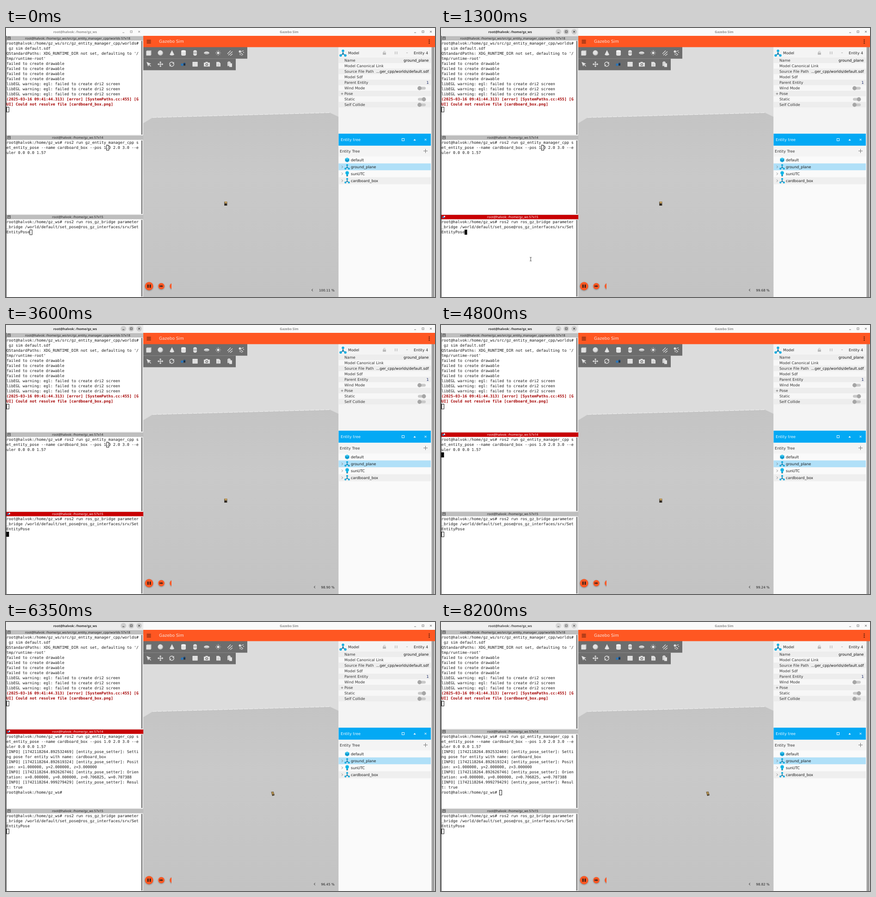
These frames come from a looping animation (928x583 px, 8.25 s). An HTML page with a canvas:

```html
<!DOCTYPE html>
<html>
<head>
<meta charset="utf-8">
<style>
html, body { margin: 0; width: 100%; height: 100%; overflow: hidden; background: #fff; }
canvas { display: block; }
</style>
</head>
<body>
<canvas id="stage" width="928" height="583"></canvas>
<script>
const stage = document.getElementById('stage');
const LOOP = 8250, COL = 5.02, ROW = 11;
const MONO = '8.34px "DejaVu Sans Mono", monospace';
const UI = '8px "DejaVu Sans", sans-serif';
const BAR = '7px "Noto Sans", sans-serif';
const USER = 'root@halvok', PROMPT = USER + ':/home/gz_ws# ';

// Times of the user's actions
const FOCUS_BOTTOM = 830, ENTER_BOTTOM = 3550, FOCUS_MIDDLE = 4150, ENTER_MIDDLE = 4450;
const LOG = 4950, MOVED = 5050, BLUR = 8150, LAND = 782;

let c = stage.getContext('2d');

const clamp = v => Math.max(0, Math.min(1, v));
const ease = v => { v = clamp(v); return v * v * (3 - 2 * v); };
const gray = v => `rgb(${v},${v},${v})`;

function rect(x, y, w, h, fill) { c.fillStyle = fill; c.fillRect(x, y, w, h); }
function frame(x, y, w, h, color, width = 1) {
  c.strokeStyle = color; c.lineWidth = width; c.strokeRect(x, y, w, h);
}
function disc(x, y, r, fill, ry = r) {
  c.fillStyle = fill; c.beginPath(); c.ellipse(x, y, r, ry, 0, 0, 7); c.fill();
}
function shape(d, fill, x = 0, y = 0) {
  c.save(); c.translate(x, y); c.fillStyle = fill; c.fill(new Path2D(d)); c.restore();
}
function line(d, color, x = 0, y = 0, width = 1) {
  c.save(); c.translate(x, y); c.strokeStyle = color; c.lineWidth = width;
  c.stroke(new Path2D(d)); c.restore();
}
function text(s, x, y, color = '#222', font = UI, align = 'left') {
  c.font = font; c.fillStyle = color; c.textAlign = align;
  c.textRendering = 'geometricPrecision';
  c.fillText(s, x, y);
}

function terminal(lines, top) {
  let row = 0;
  for (const s of lines) {
    const bold = s.startsWith('(2025');
    for (const part of s.match(/.{1,57}/g))
      text(part, 1, top + ROW * row++ + 3, bold ? '#a40000' : '#171717', (bold ? 'bold ' : '') + MONO);
  }
}
function cursor(col, row, top, solid, glyph) {
  const x = 1 + col * COL, y = top + row * ROW - 5.5;
  if (!solid) return frame(Math.round(x) + .5, Math.round(y) + .5, 5, 10.5, '#222');
  rect(Math.round(x), Math.round(y), 5.5, 11, '#000');
  if (glyph) text(glyph, x, y + 8.5, '#fff', MONO);
}
const blinkOn = (t, since) => (t - since) % 1200 < 600;

function paneBar(y, label, focused) {
  rect(1, y, 296, 9.5, focused ? '#c80003' : '#bebebe');
  text(label, 155, y + 7.3, focused ? '#fff' : '#222', BAR, 'center');
  if (focused) {
    rect(3, y + 3, 4, 4, '#3d6fae');
    rect(6, y + 2, 3, 3, '#e8e8e8');
  } else {
    frame(3.5, y + 1.5, 6, 6, '#333', .8);
    line('M3.5 5H9.5M6.5 2V5', '#333', 0, y - .5, .8);
  }
}

function windowButtons(xs, color, disk) {
  if (disk) xs.forEach(x => disc(x, 8, 6, disk));
  line('M-2 2H2', color, xs[0], 8);
  frame(xs[1] - 2, 6, 4, 4, color, .9);
  line('M-2 -2L2 2M2 -2L-2 2', color, xs[2], 8);
}

function modelIcon(x, y, k = 1) {
  c.save(); c.translate(x, y); c.scale(k, k);
  line('M0 -3V1L-4 4M0 1L4 4', '#245b78', 0, 0, 1.2);
  disc(0, -4, 2.2, '#16aee0'); disc(-4, 4, 2.2, '#16aee0');
  disc(4, 4, 2.2, '#16aee0'); disc(0, 1, 1.6, '#1583b4');
  c.restore();
}

function toolbar() {
  rect(297, 41, 225, 25.5, '#6d6d6d');
  rect(297, 66.5, 200, 25, '#6d6d6d');
  const W = '#e2e2e2', D = '#bdbdbd';
  c.save(); c.translate(309, 54);
  shape('M-5.5 -4L-4 -5.5H5.5V4L4 5.5H-5.5Z', D); rect(-5.5, -4, 9.5, 9.5, W);
  disc(25, 0, 5.8, D); disc(24.5, -.8, 4.6, W);
  shape('M50 -6L55 4Q50 7 45 4Z', W);
  rect(70, -4, 10, 8, W); disc(75, 4, 5, W, 2); disc(75, -4, 5, '#f4f4f4', 2);
  c.fillStyle = W; c.beginPath(); c.roundRect(96, -6, 8, 12, 4); c.fill(); rect(96, -2, 8, 4, D);
  disc(125, 0, 5.8, W, 3); disc(125, 1, 5, D, 1.6);
  disc(150, 0, 2.7, W);
  for (let i = 0; i < 8; i++) {
    const a = i * Math.PI / 4, x = Math.cos(a), y = Math.sin(a);
    line(`M${150 + 4 * x} ${4 * y}L${150 + 5.8 * x} ${5.8 * y}`, W);
  }
  line('M170 2L177 -5M172 5L181 -3M176 6L181 2', W, 0, 0, 1.2);
  disc(197, -3, 2.5, W);
  line('M200 -3L205 -5M199 0L204 4M197 1L198 5', W, 0, 0, 1.2);
  disc(205, -1, 1, W); disc(201, 5, 1, W);
  c.restore();

  c.save(); c.translate(309, 78.5);
  shape('M-5 -5L5 -1L1 .5L5 4L4 5L0 1.5L-1.5 5Z', W);
  line('M20 0H30M25 -5V5', W, 0, 0, 1.3);
  for (let i = 0; i < 4; i++) {
    c.save(); c.translate(25, 0); c.rotate(i * Math.PI / 2);
    shape('M0 -6.3L2.4 -3.4H-2.4Z', W); c.restore();
  }
  line('M45 1A4.6 4.6 0 0 1 53 -3M54 -1A4.6 4.6 0 0 1 46 3', W, 0, 0, 1.3);
  shape('M54.5 -5V-1H50.5ZM44.8 5V1H48.8Z', W);
  disc(72, 1, 2.8, '#2c76b8'); disc(77, -1, 2.3, '#174c83'); rect(75, -1, 4, 4, '#222f3d');
  rect(94.5, -5, 11, 10, '#f3f3f3');
  line('M98 -5V5M102 -5V5M94.5 -1.5H105.5M94.5 2H105.5', '#b0b0b0', 0, 0, .6);
  rect(119, -3.5, 13, 8.5, W); rect(122.5, -5, 5, 2, W); disc(125.3, .8, 2.8, '#6d6d6d'); disc(125.3, .8, 1.5, W);
  shape('M146 -5H152L155 -2V5H146Z', W); line('M148 0H153M148 2.5H153', '#aaa', 0, 0, .7);
  rect(170, -5, 7, 9, '#cfcfcf'); rect(172, -6, 3, 2, W); rect(174, -2, 6, 8, W);
  c.restore();
}

function scene() {
  rect(297, 41, 422.5, 542, '#dcdcdc');
  const ground = c.createLinearGradient(0, 184, 0, 583);
  ground.addColorStop(0, '#c4c4c4');
  ground.addColorStop(.35, '#c9c9c9');
  ground.addColorStop(1, '#c3c3c3');
  shape('M297 206L317 194L701 183.5L719.5 192V583H297Z', ground);
  c.setLineDash([9, 2]);
  line('M317 194L701 183.5', '#f2f2f2');
  c.setLineDash([]);
  line('M297 206L317 194M701 183.5L719 192', '#d8d8d8');
  toolbar();
  c.save();
  c.beginPath(); c.rect(297, 540, 61, 43); c.clip();
  c.shadowColor = 'rgba(0,0,0,.35)'; c.shadowBlur = 3; c.shadowOffsetY = 1;
  disc(309.5, 559.5, 9, '#ff5722'); disc(336, 559.5, 6.7, '#ff5722'); disc(361, 559.5, 6.7, '#ff5722');
  c.restore();
  rect(306, 556, 2.4, 7, '#1a1a1a'); rect(310.7, 556, 2.4, 7, '#1a1a1a');
  shape('M332.5 557.3L336 559.5L332.5 561.7ZM336 557.3L339.7 559.5L336 561.7Z', '#1a1a1a');
}

function toggle(y, on) {
  c.fillStyle = '#c9c9c9'; c.beginPath(); c.roundRect(891, y - 3, 17, 6, 3); c.fill();
  disc(on ? 904 : 894.5, y, 4.4, '#a6a6a6');
}

function inspector() {
  rect(719.5, 41, 208.5, 542, '#fafafa');
  rect(719.5, 41, 200.5, 188, '#f4f4f4');
  rect(920.5, 41, 6.5, 542, '#a0a0a0');
  modelIcon(729, 54.5, 1.25);
  text('Model', 740, 57);
  text('Entity 4', 913, 57, '#222', UI, 'right');
  rect(815, 53, 7, 5, '#bcbcbc'); line('M817 53V50.5H820.5V51.5', '#bcbcbc');
  rect(841, 51, 1.5, 6, '#bcbcbc'); rect(845, 51, 1.5, 6, '#bcbcbc');
  shape('M865.5 53H869.5L867.5 55Z', '#bcbcbc');
  ['Name', 'Model Canonical Link', 'Source File Path', 'Model Sdf', 'Parent Entity',
    'Wind Mode', 'Pose', 'Static', 'Self Collide'].forEach((s, i) => {
    const y = 70 + i * 12;
    rect(719.5, y - 6, 199.5, 12, i % 2 ? '#f7f7f7' : '#ededed');
    text(s, 732, y + 3, '#333');
  });
  text('ground_plane', 914.5, 73, '#111', UI, 'right');
  text('...ger_cpp/worlds/default.sdf', 914.5, 97, '#111', UI, 'right');
  text('1', 914.5, 121, '#0b1a5c', UI, 'right');
  line('M724.5 142.5H729.5M727 140V145', '#666', 0, 0, .8);
  toggle(130.5); toggle(154.5, true); toggle(166.5);

  rect(719.5, 229, 199.5, 26, '#03a9f4');
  text('Entity tree', 724, 245, '#f4fbff', '8.2px "DejaVu Sans", sans-serif');
  frame(856.5, 239.5, 5, 5, '#fff', .9);
  shape('M881.5 244H886.5L884 240.5Z', '#fff');
  line('M-2 -2L2 2M2 -2L-2 2', '#fff', 907.5, 242);
  rect(719.5, 255, 199.5, 23.5, '#f4f4f4');
  text('Entity Tree', 722, 269.5, '#333', '8.2px "DejaVu Sans", sans-serif');
  line('M903 266.5H912M907.5 262V271', '#777');
  ['default', 'ground_plane', 'sunUTC', 'cardboard_box'].forEach((s, i) => {
    const y = 286 + i * 15;
    rect(719.5, y - 7.5, 199.5, 15, ['#fafafa', '#b0e0f8', '#fafafa', '#efefef'][i]);
    text(s, 746, y + 2.8, '#1b1b1b');
    if (i) line('M-1 -2.5L1.5 0L-1 2.5', '#777', 727, y, .9);
    if (i % 2) modelIcon(738, y, .95);
  });
  shape('M738 281L742.5 283.3V288.5L738 291L733.5 288.5V283.3Z', '#0e9bd0');
  shape('M738 281L742.5 283.3L738 285.7L733.5 283.3Z', '#3cc8ef');
  disc(738, 314, 3.8, '#13b5e6'); rect(736, 317, 4, 3.5, '#13b5e6'); rect(736.5, 320, 3, 1.5, '#45606c');
}

function backdrop() {
  rect(0, 0, 928, 583, '#fff');
  rect(297, 0, 631, 17, '#fafafa');
  text('Gazebo Sim', 612.5, 10.5, '#8c8c8c', 'bold ' + BAR, 'center');
  windowButtons([885, 902, 919], '#777');
  scene();
  inspector();
  rect(297, 17, 631, 24.5, '#ff5722');
  line('M304.5 26.5H313.5M304.5 29.5H313.5M304.5 32.5H313.5', '#2a0d05', 0, 0, 1.2);
  text('Gazebo Sim', 331, 32.3, '#f8e6df', '9px "DejaVu Sans", sans-serif');
  for (const y of [26, 29.5, 33]) disc(915.5, y, 1.1, '#2a0d05');

  rect(0, 17, 1, 566, '#333');
  for (const [y, h] of [[27, 204], [243, 160], [415, 167]]) {
    rect(292, y, 4, h, '#ececec');
    rect(292.7, y + 1, 2.3, h - 1, '#777');
  }
  rect(1, 231, 296, 2, '#eee'); rect(1, 403, 296, 2, '#eee'); rect(296, 17, 1, 566, '#ddd');
  paneBar(17.5, USER + ': /home/gz_ws/src/gz_entity_manager_cpp/worlds 57x18', false);
  terminal([
    USER + ':/home/gz_ws/src/gz_entity_manager_cpp/worlds# gz sim default.sdf',
    "QStandardPaths: XDG_RUNTIME_DIR not set, defaulting to '/tmp/runtime-root'",
    ...Array(4).fill('failed to create drawable'),
    ...Array(3).fill('libEGL warning: egl: failed to create dri2 screen'),
    '(2025-03-16 09:41:44.313) [error] [SystemPaths.cc:455] [GUI] Could not resolve file [cardboard_box.png]'
  ], 33);
  cursor(0, 13, 33, false);
  terminal([PROMPT + 'ros2 run gz_entity_manager_cpp set_entity_pose --name cardboard_box --pos 1.0 2.0 3.0 --euler 0.0 0.0 1.57'], 248);
  terminal([PROMPT + 'ros2 run ros_gz_bridge parameter_bridge /world/default/set_pose@ros_gz_interfaces/srv/SetEntityPose'], 420);
}

const info = (nanos, s) => `[INFO] [1742118264.${nanos}] [entity_pose_setter]: ${s}`;
const poseLog = [
  info('892532469', 'Setting pose for entity with name: cardboard_box'),
  info('892619324', 'Position: x=1.000000, y=2.000000, z=3.000000'),
  info('892626746', 'Orientation: x=0.000000, y=0.000000, z=0.706825, w=0.707388')
];
const result = [info('999279429', 'Result: true'), PROMPT];

function titleBar(t) {
  const k = clamp((t - 850) / 200) * (1 - clamp((t - BLUR) / 200));
  rect(0, 0, 297, 17, gray(250 - 15 * k));
  const ink = gray(Math.round(143 - 95 * k));
  text(USER + ': /home/gz_ws', 149.5, 10.5, ink, 'bold ' + BAR, 'center');
  windowButtons([254, 271, 288], ink, k > 0 && `rgba(205,205,205,${k})`);
}

function panes(t) {
  const bottom = t >= FOCUS_BOTTOM && t < FOCUS_MIDDLE;
  const middle = t >= FOCUS_MIDDLE && t < BLUR;
  paneBar(233, USER + ': /home/gz_ws 57x14', middle);
  paneBar(405, USER + ': /home/gz_ws 57x15', bottom);

  if (t >= LOG) terminal(poseLog, 281);
  if (t >= MOVED) terminal(result, 347);
  const sent = t >= ENTER_MIDDLE, done = t >= MOVED;
  if (!middle || blinkOn(t, sent ? ENTER_MIDDLE : FOCUS_MIDDLE))
    cursor(done ? 25 : sent ? 0 : 43, done ? 11 : sent ? 3 : 1, 248, middle, sent ? '' : '.');

  const bridged = t >= ENTER_BOTTOM;
  if (!bottom || blinkOn(t, bridged ? ENTER_BOTTOM : FOCUS_BOTTOM))
    cursor(bridged ? 0 : 10, bridged ? 3 : 2, 420, bottom);
}

function cardboardBox(t) {
  if (t < MOVED) {
    rect(472, 376.5, 6.5, 8.5, '#55504a');
    rect(473, 376, 5, 4.5, '#bd9858');
    rect(473, 380.5, 4.5, 4, '#2c2620');
    return;
  }
  const fall = Math.min(1, (t - MOVED) / LAND);
  const lift = 10 * (1 - fall * fall);
  const x = 577 + lift / 3, y = 372 - lift;
  if (lift > .5)
    shape('M-3.5 -4L1.5 -4L3.5 3.5L-1 4Z', '#66696c', 577 + lift * .5, 372 + lift * 1.65);
  if (lift > 2) {
    shape('M-3.5 -3.5L2.5 -4L3.5 2.5L-2.5 4Z', '#3b3328', x, y);
    shape('M-3 -3L2.5 -3.5L3.5 1L-2 1.5Z', '#c0a052', x, y);
  } else {
    shape('M-3.5 -4L1.5 -4.5L4 3.5L-1 5Z', '#453b2c', x, y);
    shape('M-3 -3.5L1 -4L3 1.5L-1 2Z', '#ae8d4e', x, y);
  }
}

const rates = [[0, 100.11], [400, 99.94], [800, 99.81], [1200, 99.68], [1600, 99.42], [2000, 98.97],
  [2400, 98.38], [2900, 98.71], [3350, 98.9], [3800, 99.07], [4300, 99.15], [4700, 99.24], [5050, 97.12],
  [5400, 94.44], [5700, 95.36], [6100, 96.45], [6500, 97.08], [6900, 97.64], [7400, 98.17], [7800, 98.5], [8150, 98.82]];

function rate(t) {
  const value = rates.findLast(r => r[0] <= t)[1];
  text(value.toFixed(2) + ' %', 710.7, 570.7, '#222', '7.1px "DejaVu Sans", sans-serif', 'right');
  line('M1.3 -2.3L-1.2 0L1.3 2.3', '#222', value >= 100 ? 662.5 : 667.5, 568);
}

function pointer(t) {
  const hidden = t < 400 || (t > ENTER_BOTTOM && t < 3700) || t > ENTER_MIDDLE;
  if (hidden) return;
  let x = 280 - 86 * ease((t - 400) / 350), y = 535 - 34 * ease((t - 400) / 350);
  x -= 2 * ease((t - 1700) / 600); y -= 12 * ease((t - 1700) / 600);
  y -= 160 * ease((t - 3700) / 400);
  line('M-2 -4H-.5L0 -3.5L.5 -4H2M0 -3.5V3.5M-2 4H-.5L0 3.5L.5 4H2', '#333', x, y, .9);
}

// The unchanging parts are painted once
const screen = c, base = document.createElement('canvas');
base.width = 928; base.height = 583;
c = base.getContext('2d');
backdrop();
c = screen;

const start = performance.now();
function draw() {
  const t = (performance.now() - start) % LOOP;
  c.drawImage(base, 0, 0);
  titleBar(t);
  panes(t);
  cardboardBox(t);
  rate(t);
  pointer(t);
  requestAnimationFrame(draw);
}
draw();
</script>
</body>
</html>
```
